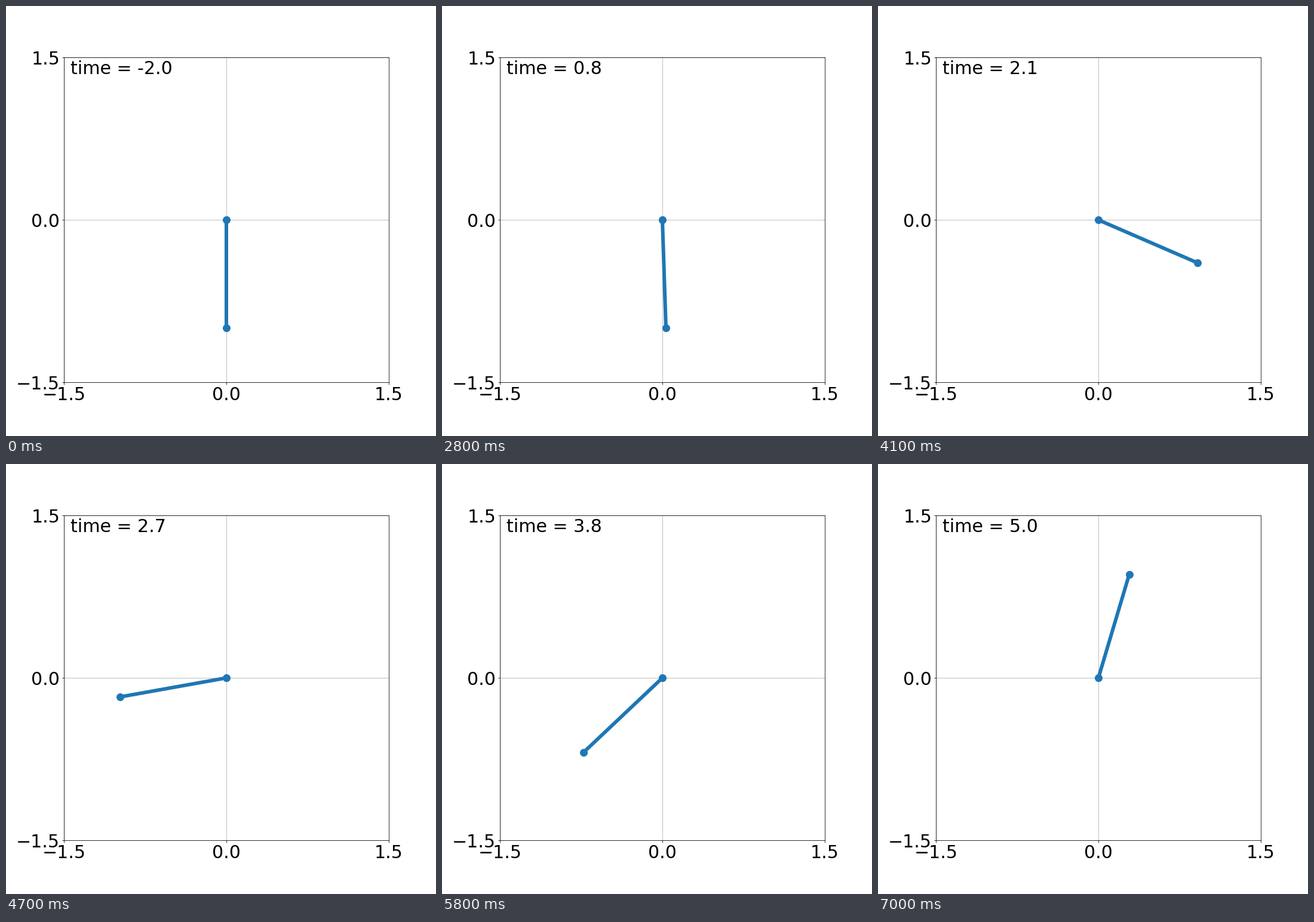
A matplotlib script for the animation above (7020 ms loop, 720 by 720 pixels).

```python
import numpy as np
import matplotlib.pyplot as plt
from matplotlib.animation import FuncAnimation

SIZE, DPI = 720, 72
TICK_MS = 20          # the last pose lasts one tick, all others five
TICKS_PER_POSE = 5
TICKS = 351
START = -2.0

# Turning points of the swing: seconds, and degrees from hanging
KEY_TIMES = np.array([0, 0.4, 0.8, 1.0, 1.3, 2.1, 3.0, 3.3, 3.6, 4.3, 5.0])
KEY_ANGLES = np.array([0, -9, 1.9, -8, -76, -293.4, -474, -463.5, -451.5,
                       -247.2, -196.6])
SLOPES = np.gradient(KEY_ANGLES, KEY_TIMES)
SLOPES[[0, -1]] = 0   # start and end at rest


def swing(t):
    """Angle in radians, by cubic Hermite interpolation of the keys."""
    t = max(t, 0)
    k = min(np.searchsorted(KEY_TIMES, t, side="right"), len(KEY_TIMES) - 1)
    (t0, t1), (a0, a1), (s0, s1) = (
        v[k - 1:k + 1] for v in (KEY_TIMES, KEY_ANGLES, SLOPES))
    u = (t - t0) / (t1 - t0)
    angle = a0 + (a1 - a0) * u * u * (3 - 2 * u)
    angle += (t1 - t0) * u * (1 - u) * (s0 * (1 - u) - s1 * u)
    return np.radians(angle)


plt.rcParams.update({"font.family": "DejaVu Sans", "font.size": 30})
fig, ax = plt.subplots(figsize=(SIZE / DPI, SIZE / DPI), dpi=DPI,
                       facecolor="white")
fig.subplots_adjust(left=0.125, right=0.9, bottom=0.125, top=0.88)
ax.set_aspect("equal")
ax.set(xlim=(-1.5, 1.5), ylim=(-1.5, 1.5),
       xticks=[-1.5, 0, 1.5], yticks=[-1.5, 0, 1.5])
ax.grid(color="#b0b0b0", linewidth=0.8)

rod, = ax.plot([], [], "o-", color="#1f77b4", linewidth=6, markersize=12)
clock = ax.text(0.02, 0.95, "", transform=ax.transAxes)


def update(tick):
    t = round(START + 0.1 * (tick // TICKS_PER_POSE), 1)
    angle = swing(t)
    rod.set_data([0, np.sin(angle)], [0, -np.cos(angle)])
    clock.set_text(f"time = {t:.1f}")
    return rod, clock


anim = FuncAnimation(fig, update, frames=TICKS, interval=TICK_MS,
                     init_func=lambda: update(0), blit=True,
                     repeat=True, repeat_delay=0)
plt.show()
```
